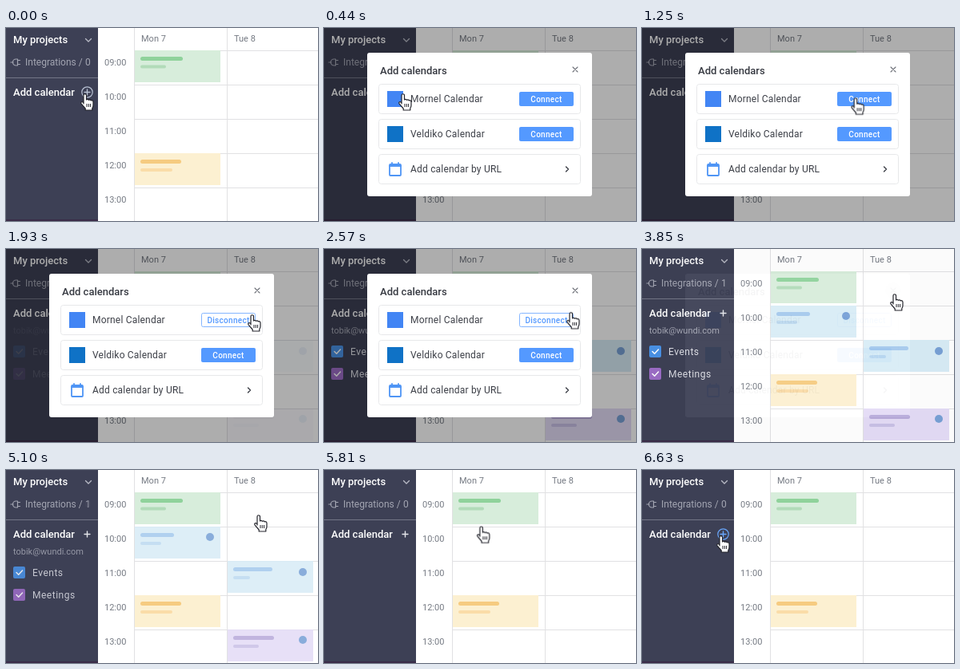
An HTML page that plays this animation: 390x242 px, repeating every 6.81 s.

```html
<!DOCTYPE html>
<html lang="en">
<head>
<meta charset="utf-8">
<title>Connect a calendar</title>
<style>
html, body { margin: 0; width: 100%; height: 100%; overflow: hidden; background: #fff; }
svg { display: block; width: 390px; height: 242px; font-family: Roboto, "Noto Sans", sans-serif; }
.loop { animation: 6810ms linear infinite; }

.head { font-size: 13px; font-weight: 500; fill: #fff; }
.dim { font-size: 12px; fill: #a3a5b2; }
.mail { font-size: 11px; fill: #a3a5b2; }
.check { font-size: 12px; letter-spacing: .5px; fill: #dcdde4; }
.hour { font-size: 11px; fill: #757a83; }
.grid { stroke: #e1e1e3; fill: none; }
.line { fill: none; stroke-linecap: round; stroke-linejoin: round; }
.row { fill: #fff; stroke: #e7e8ea; }
.option { font-size: 12px; letter-spacing: .2px; fill: #3c3f47; }
.button { font-size: 10px; font-weight: 500; letter-spacing: .3px; text-anchor: middle; fill: #fff; }

.modal { animation-name: modal; }
.on { animation-name: on; }
.off { animation-name: off; }
.linked { animation-name: linked; }
.unlinked { animation-name: unlinked; }
.close { animation-name: close; }
.ring { animation-name: ring; }
.plus { animation-name: plus; }
.move { animation-name: move; }
.dip { animation-name: dip; }

@keyframes modal {
  0%, 2.64% { opacity: 0; animation-timing-function: cubic-bezier(.25, .46, .45, .94); }
  6.46% { opacity: 1; }
  54.04% { opacity: 1; animation-timing-function: cubic-bezier(.25, .46, .45, .94); }
  57.27%, 100% { opacity: 0; }
}
@keyframes on {
  0%, 23.05% { opacity: 0; }
  25.7%, 60% { opacity: 1; }
  60.01%, 100% { opacity: 0; }
}
@keyframes off {
  0%, 23.05% { opacity: 1; }
  25.7%, 60% { opacity: 0; }
  60.01%, 100% { opacity: 1; }
}
@keyframes linked {
  0%, 27.75% { opacity: 0; }
  31.72%, 74.3% { opacity: 1; }
  79%, 100% { opacity: 0; }
}
@keyframes unlinked {
  0%, 27.75% { opacity: 1; }
  31.72%, 74.3% { opacity: 0; }
  79%, 100% { opacity: 1; }
}
@keyframes close {
  0%, 41.12% { opacity: 0; }
  43.32%, 60% { opacity: 1; }
  60.01%, 100% { opacity: 0; }
}
@keyframes ring {
  0%, 7% { opacity: 1; }
  10%, 93.98% { opacity: 0; }
  97.36%, 100% { opacity: 1; }
}
@keyframes plus {
  0%, 7% { stroke: #b9c2d4; }
  10%, 93.98% { stroke: #e4e5ea; }
  97.36%, 100% { stroke: #68a6fb; }
}
@keyframes move {
  0% { transform: translate(93px, 82px); }
  12.92% { transform: translate(93px, 82px); animation-timing-function: cubic-bezier(.25, .46, .45, .94); }
  23.05% { transform: translate(302px, 82px); }
  37.37% { transform: translate(302px, 82px); animation-timing-function: cubic-bezier(.25, .46, .45, .94); }
  43.32% { transform: translate(310px, 56px); }
  82.6% { transform: translate(310px, 56px); animation-timing-function: cubic-bezier(.25, .46, .45, .94); }
  91.34%, 100% { transform: translate(93px, 82px); }
}
@keyframes dip {
  0%, 12.92% { transform: translateY(0); animation-timing-function: ease-in-out; }
  15.89% { transform: translateY(7px); animation-timing-function: ease-in-out; }
  23.05%, 100% { transform: translateY(0); }
}
</style>
</head>
<body>
<svg viewBox="0 0 390 242">
  <rect width="390" height="242" fill="#fff"/>

  <!-- calendar -->
  <path class="grid" d="M160.5 0V242M276.5 0V242M160 28.5H390M160 71.5H390M160 114.5H390M160 157.5H390M160 200.5H390"/>
  <g class="hour">
    <text x="169" y="17">Mon 7</text>
    <text x="285" y="17">Tue 8</text>
    <text x="123" y="47">09:00</text>
    <text x="123" y="90">10:00</text>
    <text x="123" y="133">11:00</text>
    <text x="123" y="176">12:00</text>
    <text x="123" y="219">13:00</text>
  </g>
  <g transform="translate(161 28)">
    <rect width="107" height="40" fill="#d7eddb"/>
    <rect x="7" y="8" width="53" height="5" rx="2.5" fill="#8fd29b"/>
    <rect x="7" y="18.5" width="32" height="4" rx="2" fill="#b2dbb9"/>
  </g>
  <g transform="translate(161 157)">
    <rect width="107" height="40" fill="#fcf0d1"/>
    <rect x="7" y="8" width="51" height="5" rx="2.5" fill="#f6cb80"/>
    <rect x="7" y="19" width="40" height="4" rx="2" fill="#fadca8"/>
  </g>
  <g class="loop linked">
    <g transform="translate(161 71)">
      <rect width="107" height="40" fill="#d8ecf6"/>
      <rect x="7" y="8" width="42" height="5" rx="2.5" fill="#a5c9ed"/>
      <rect x="7" y="19" width="26" height="4" rx="2" fill="#bddaf0"/>
      <circle cx="94" cy="13" r="5" fill="#78a1d6"/>
    </g>
    <g transform="translate(277 114)">
      <rect width="107" height="40" fill="#d8ecf6"/>
      <rect x="7" y="8" width="49" height="5" rx="2.5" fill="#a5c9ed"/>
      <rect x="7" y="19" width="21" height="4" rx="2" fill="#bddaf0"/>
      <circle cx="94" cy="14" r="5" fill="#78a1d6"/>
    </g>
    <g transform="translate(277 200)">
      <rect width="107" height="40" fill="#e4dcf6"/>
      <rect x="7" y="8" width="51" height="5" rx="2.5" fill="#b8abdb"/>
      <rect x="7" y="19" width="32" height="4" rx="2" fill="#c9c0e6"/>
      <circle cx="94" cy="13" r="5" fill="#78a1d6"/>
    </g>
  </g>

  <!-- sidebar -->
  <rect width="115" height="242" fill="#3d4055"/>
  <rect y="240" width="115" height="2" fill="#3a2c48"/>
  <path d="M0 62.5H115" stroke="#737687"/>
  <text class="head" x="9" y="19">My projects</text>
  <path class="line" d="M99.5 13.5l3.5 3.5 3.5-3.5" stroke="#b9bbc6" stroke-width="1.3"/>
  <path class="line" d="M6 43h3M17.500 40.500h-3M17.500 45.500h-3M14.500 39v8h-2a4 4 0 0 1 0-8z" stroke="#a3a5b2" stroke-width="1.2"/>
  <text class="dim" x="24" y="47">Integrations /</text>
  <text class="dim loop unlinked" x="99" y="47">0</text>
  <text class="dim loop linked" x="99" y="47">1</text>
  <text class="head" x="9" y="85">Add calendar</text>
  <g class="line loop plus" stroke="#e4e5ea" stroke-width="1.4">
    <path d="M98 80.500h7M101.500 77v7"/>
    <circle class="loop ring" cx="101.500" cy="80.500" r="6.700" stroke-width="1.200"/>
  </g>
  <g class="loop linked">
    <text class="mail" x="9" y="106">tobik@wundi.com</text>
    <rect x="9" y="121" width="15" height="15" rx="2" fill="#4a92e6"/>
    <rect x="9" y="149" width="15" height="15" rx="2" fill="#9c6cc6"/>
    <path class="line" d="M13 128.500l2.700 2.700 4.800-5.200M13 156.500l2.700 2.700 4.800-5.200" stroke="#fff" stroke-width="1.500"/>
    <text class="check" x="33" y="133">Events</text>
    <text class="check" x="33" y="161">Meetings</text>
  </g>

  <!-- dialog -->
  <g class="loop modal">
    <rect width="390" height="242" fill="#000" opacity=".32"/>
    <rect x="54" y="31" width="281" height="180" rx="3" fill="#fff"/>
    <text class="head" x="70" y="58" style="fill:#373a42">Add calendars</text>
    <circle class="loop close" cx="314" cy="52" r="10" fill="#dedfe1"/>
    <path class="line" d="M311 49l6 6M317 49l-6 6" stroke="#6d7078" stroke-width="1.100"/>
    <g class="row">
      <rect x="68.500" y="70.500" width="252" height="37" rx="3"/>
      <rect x="68.500" y="114.500" width="252" height="37" rx="3"/>
      <rect x="68.500" y="158.500" width="252" height="37" rx="3"/>
    </g>
    <rect x="79" y="79" width="20" height="20" fill="#4285f4"/>
    <rect x="79" y="123" width="20" height="20" fill="#0f72c6"/>
    <g class="line" stroke="#4f95f5" stroke-width="1.800">
      <rect x="82" y="171" width="14" height="14" rx="1"/>
      <path d="M82 173h14M85 169v2M93 169v2"/>
    </g>
    <g class="option">
      <text x="108" y="93">Mornel Calendar</text>
      <text x="108" y="137">Veldiko Calendar</text>
      <text x="108" y="181">Add calendar by URL</text>
    </g>
    <path class="line" d="M302.500 174l3 3-3 3" stroke="#3c3f47" stroke-width="1.400"/>
    <g class="button">
      <g class="loop off">
        <rect x="244" y="80" width="68" height="18" rx="2" fill="#5499ff"/>
        <text x="278" y="93">Connect</text>
      </g>
      <g class="loop on">
        <rect x="244.500" y="80.500" width="67" height="17" rx="2" fill="#fff" stroke="#84b5ff"/>
        <text x="278" y="93" style="fill:#5499ff">Disconnect</text>
      </g>
      <rect x="244" y="124" width="68" height="18" rx="2" fill="#5499ff"/>
      <text x="278" y="137">Connect</text>
    </g>
  </g>

  <!-- pointer -->
  <g class="loop move">
    <g class="loop dip">
      <path d="M4 13V2.500a1.750 1.750 0 0 1 3.500 0V8q1.500-1.200 3 .3 1.600-.9 2.800.5 2.600-.6 2.700 2V15q0 2-1.200 3.500V21H6.200V19L1 12.800q-.8-1.800.8-2.200 1.200-.2 2.200 1.400z" fill="#fff" stroke="#24252c" stroke-width="1.200" stroke-linejoin="round"/>
      <path d="M8 13v4M10.300 13v4M12.600 13v4" stroke="#24252c"/>
    </g>
  </g>
</svg>
</body>
</html>
```
